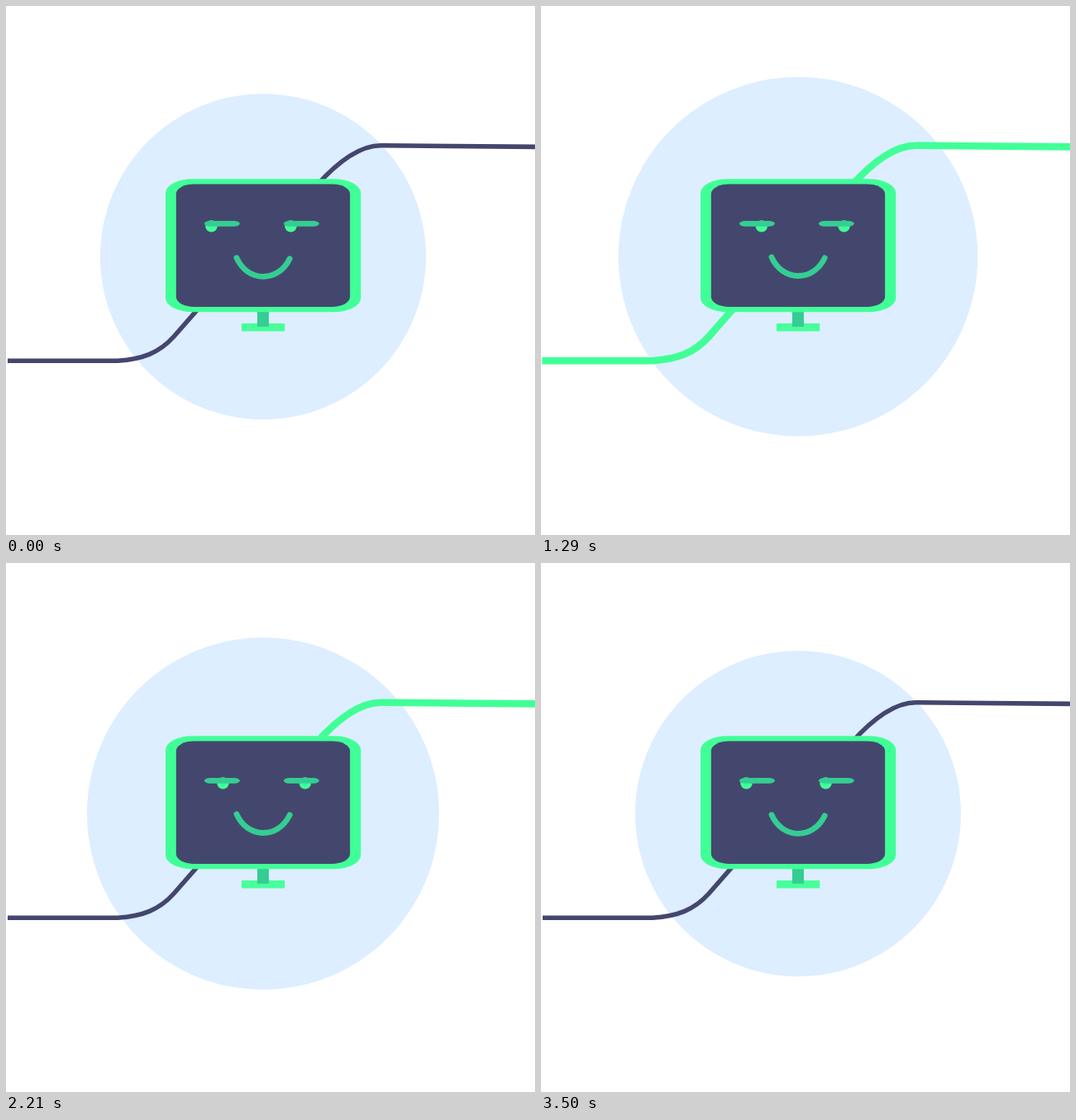
These frames come from a looping animation (640x640 px, 3710 ms). An HTML page:

```html
<!DOCTYPE html>
<html lang="en">
<head>
<meta charset="utf-8">
<title>Happy monitor</title>
<style>
  html, body { margin: 0; width: 100%; height: 100%; overflow: hidden; background: #fff; }
  svg { display: block; width: 100vw; height: 100vh; }
</style>
</head>
<body>
<svg viewBox="0 0 640 640">
  <circle id="halo" cx="311" cy="303.2" r="197" fill="#dceeff"/>

  <g fill="none">
    <path id="wire" stroke="#44466e" stroke-width="5.6"
      d="M2 429.3H135C165 427 185 420 203 400L232 367L375 218C400 190 428 168 455 168.8L642 170.4"/>
    <path id="charge" stroke="#41ff97" stroke-width="8.6"
      d="M1.3 429.3H135C165 427 185 420 203 400L232 367L375 218C400 190 428 168 455 168.8L642 170.4"/>
  </g>

  <rect x="285" y="384" width="52.3" height="9.5" rx="1" fill="#48ff9b"/>
  <rect x="304" y="368" width="14" height="20" fill="#35cd93"/>
  <rect x="193" y="209.2" width="236.3" height="161" rx="33" ry="17" fill="#41ff97"/>
  <rect x="205.8" y="215.4" width="210.4" height="148.6" rx="22" ry="12" fill="#44476d"/>

  <g fill="#41ff97">
    <circle id="left" cx="248.5" cy="266.4" r="7.2"/>
    <circle id="right" cx="344.5" cy="266.4" r="7.2"/>
  </g>
  <g fill="#35cd93">
    <rect x="240" y="259.9" width="42.8" height="6.9" rx="7" ry="3.45"/>
    <rect x="336" y="259.9" width="42.8" height="6.9" rx="7" ry="3.45"/>
  </g>
  <path id="mouth" d="M279 304.7C292 334.2 329 335.2 343.2 305.7" fill="none"
    stroke="#35cd93" stroke-width="6.8" stroke-linecap="round"/>
</svg>
<script>
  const LOOP = 3710, STEP = 1000 / 14, LAST = 49;
  const PULSE = 1750, PEAK = 960;
  const SMILE = 1500, SMILE_GAP = 2000;

  // [ms, amount] over one pulse
  const pulse = [
    [0, 0], [178, 0.255], [554, 0.69], [714, 0.83], [821, 0.925], [PEAK, 1],
    [1107, 0.963], [1143, 0.93], [1286, 0.752], [1393, 0.63], [1679, 0.148], [PULSE, 0]
  ];

  const el = id => document.getElementById(id);
  const halo = el('halo'), charge = el('charge'), mouth = el('mouth');
  const left = el('left'), right = el('right');
  const len = charge.getTotalLength();

  function slope(i) {
    const a = pulse[Math.max(i - 1, 0)];
    const b = pulse[Math.min(i + 1, pulse.length - 1)];
    return (b[1] - a[1]) / (b[0] - a[0]);
  }

  // Smooth curve through the pulse points
  function amount(t) {
    let i = 0;
    while (i < pulse.length - 2 && t >= pulse[i + 1][0]) i++;
    const [t0, y0] = pulse[i], [t1, y1] = pulse[i + 1];
    const h = t1 - t0, u = (t - t0) / h, v = 1 - u;
    const y = v * v * (1 + 2 * u) * y0 + u * u * (3 - 2 * u) * y1
      + h * u * v * (v * slope(i) - u * slope(i + 1));
    return Math.min(Math.max(y, 0), 1);
  }

  function smile(t) {
    const u = t % SMILE_GAP;
    return u < SMILE ? Math.sin(Math.PI * u / SMILE) ** 2 : 0;
  }

  function drawCharge(t, e) {
    const filling = t < PULSE;
    const part = t % PULSE < PEAK ? e : 1;
    const empty = filling ? part < 0.001 : part > 0.999;
    charge.style.display = empty ? 'none' : '';
    charge.setAttribute('stroke-dasharray', filling
      ? `${part * (len + 1)} ${2 * len}`
      : `0 ${part * len} ${2 * len} ${len}`);
  }

  function draw(now) {
    const step = Math.min(LAST, Math.floor((now % LOOP + 5) / STEP));
    const t = step === LAST ? 0 : step * STEP;
    const e = amount(t % PULSE);
    halo.setAttribute('r', 197 + 27 * e);
    left.setAttribute('cx', 248.5 + 21 * e + 4.5 * e * e);
    right.setAttribute('cx', 344.5 + 29.4 * e);
    mouth.setAttribute('transform', `translate(0 ${-4.5 * smile(t)})`);
    drawCharge(t, e);
  }

  const start = performance.now();
  function tick() {
    draw(performance.now() - start);
    requestAnimationFrame(tick);
  }
  tick();
</script>
</body>
</html>
```
